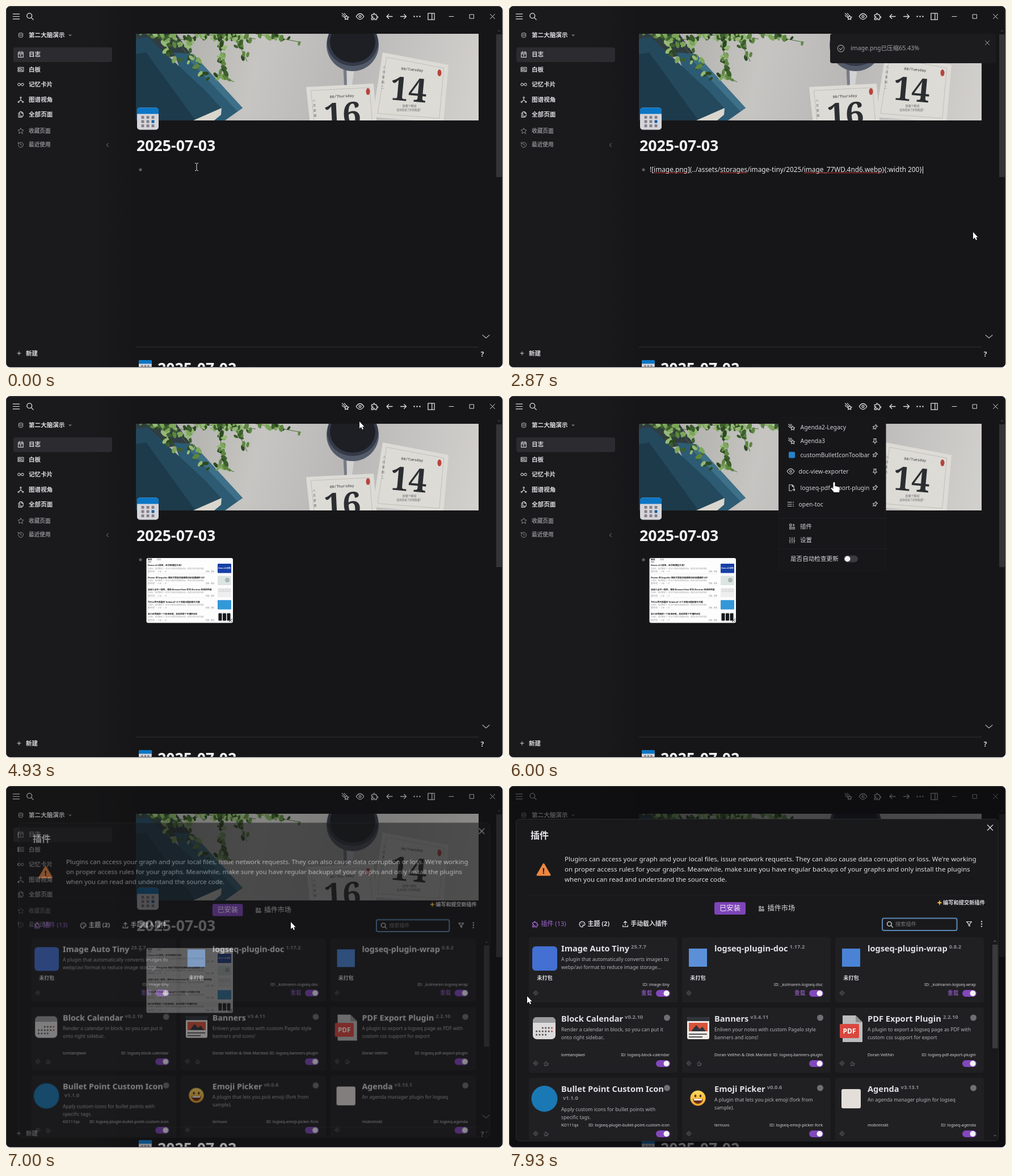
Write an HTML page with a canvas that moves like this. It is 876 px wide and 639 px high and loops after 8000 ms.

```html
<!DOCTYPE html>
<html lang="zh-CN">
<head>
<meta charset="utf-8">
<style>
html, body { margin: 0; width: 100%; height: 100%; overflow: hidden; background: #fff; }
canvas { display: block; }
</style>
</head>
<body>
<canvas id="stage" width="876" height="639"></canvas>
<script>
const W = 876, H = 639, LOOP = 8000, STEP = 200 / 3;
const SANS = '"Noto Sans", "Noto Sans CJK SC", "Noto Sans CJK", sans-serif';
const BG = '#161618', LIGHT = '#dcdce0', DIM = '#8a8a8f', PURPLE = '#a566dc';
const stage = document.getElementById('stage').getContext('2d');
let g = stage;

const ICONS = {
  menu: 'M3 5h18M3 12h18M3 19h18',
  search: 'M3 10a7 7 0 1 0 14 0a7 7 0 1 0-14 0M21 21l-6-6',
  db: 'M4 6a8 3 0 1 0 16 0a8 3 0 1 0-16 0V18a8 3 0 0 0 16 0V6M4 12a8 3 0 0 0 16 0',
  calendar: 'M4 5h16v16H4zM16 2v5M8 2v5M4 10h16M12 13v5M10 14l2-1',
  board: 'M3 5h18v14H3zM6 9h6v6H6zM16 8v5M15 16h3',
  infinity: 'M9.8 9.8a4 4 0 1 0 0 4.4L14.2 9.8a4 4 0 1 1 0 4.4z',
  graph: 'M12 7v6l-5 4M12 13l5 4M10 5a2 2 0 1 0 4 0a2 2 0 1 0-4 0M3 19a2 2 0 1 0 4 0a2 2 0 1 0-4 0M17 19a2 2 0 1 0 4 0a2 2 0 1 0-4 0',
  files: 'M15 3v5h5M9 3h6l5 5v9H9zM16 17v4H5V7h4',
  star: 'M12 17.7l-6.2 3.3 1.2-6.9-5-4.9 6.9-1L12 2l3.1 6.2 6.9 1-5 4.9 1.2 6.9z',
  history: 'M3 12a9 9 0 1 0 3-6.7M3 3v5h5M12 8v4l3 2',
  comet: 'M15.5 18.5l-4 2 .8-4-3-3 4-.5 2.200-4 2.200 4 4 .5-3 3 .8 4zM3 3l8 8M9 3l4 4M3 9l4 4',
  eye: 'M1 12q11-16 22 0q-11 16-22 0zM9 12a3 3 0 1 0 6 0a3 3 0 1 0-6 0',
  puzzle: 'M4 7h4V5a2 2 0 0 1 4 0v2h5v5h2a2 2 0 0 1 0 4h-2v5h-5v-2a2 2 0 0 0-4 0v2H3v-5h2a2 2 0 0 0 0-4H3V7z',
  back: 'M4 12h16M4 12l6 6M4 12l6-6',
  forward: 'M4 12h16M20 12l-6 6M20 12l-6-6',
  dots: 'M4 12h.01M12 12h.01M20 12h.01',
  panel: 'M3 3h18v18H3zM14 3v18',
  min: 'M4 12h16',
  max: 'M5 5h14v14H5z',
  close: 'M4 4l16 16M20 4L4 20',
  down: 'M3 8l9 8 9-8',
  left: 'M15 5l-7 7 7 7',
  plus: 'M12 4v16M4 12h16',
  pin: 'M9 4v6l-3 4v2h12v-2l-3-4V4M12 16v6M7 4h10',
  export: 'M14 3v5h5M12 21H5V3h9l5 5v6M14 18h8M19 15l3 3-3 3',
  list: 'M3 6h12M3 12h12M3 18h12M19 6h2M19 12h2M19 18h2',
  apps: 'M4 4h6v6H4zM4 14h6v6H4zM14 14h6v6h-6zM14 7h6M17 4v6',
  sliders: 'M5 3v8M5 17v4M3 14h4M12 3v3M12 12v9M10 9h4M19 3v10M19 18v3M17 15h4',
  check: 'M2 12a10 10 0 1 0 20 0a10 10 0 1 0-20 0M7 12l4 4 6-7',
  palette: 'M12 21a9 9 0 1 1 9-9c0 3-3 4-5 3s-3 1-2 3-1 3-2 3M8 10h.01M12 7h.01M16 10h.01',
  upload: 'M4 16v5h16v-5M12 16V3M7 8l5-5 5 5',
  filter: 'M3 4h18l-7 8v8l-4-3v-5z',
  gear: 'M4 12a8 8 0 1 0 16 0a8 8 0 1 0-16 0M9 12a3 3 0 1 0 6 0a3 3 0 1 0-6 0M12 2v2M12 20v2M2 12h2M20 12h2',
  cup: 'M3 11h14v5q0 4-4 4H7q-4 0-4-4zM17 13q5-1 4 2t-5 2M8 8V4M12 8V5M3 22h14'
};
for (const k in ICONS) ICONS[k] = new Path2D(ICONS[k]);

function icon(name, x, y, size = 14, color = LIGHT, lw = 1.2, turn = 0) {
  const s = size / 24;
  g.save();
  g.translate(x, y); g.rotate(turn); g.scale(s, s); g.translate(-12, -12);
  g.strokeStyle = color; g.lineWidth = lw / s; g.lineCap = g.lineJoin = 'round';
  g.stroke(ICONS[name]);
  g.restore();
}
function text(str, x, y, size, color = LIGHT, weight = 400, align = 'left', family = SANS) {
  g.font = `${weight} ${size}px ${family}`;
  g.textAlign = align; g.fillStyle = color;
  g.fillText(str, x, y + size * .36);
  return g.measureText(str).width;
}
function box(x, y, w, h, color, r = 0, border) {
  g.beginPath(); g.roundRect(x, y, w, h, r);
  if (color) { g.fillStyle = color; g.fill(); }
  if (border) { g.strokeStyle = border; g.lineWidth = 1; g.stroke(); }
}
function poly(points, color, border, lw = 1) {
  g.beginPath();
  for (let i = 0; i < points.length; i += 2) g.lineTo(points[i], points[i + 1]);
  g.closePath();
  if (color) { g.fillStyle = color; g.fill(); }
  if (border) { g.strokeStyle = border; g.lineWidth = lw; g.stroke(); }
}
function oval(x, y, rx, ry, color, turn = 0) {
  g.beginPath(); g.ellipse(x, y, rx, ry, turn, 0, 7); g.fillStyle = color; g.fill();
}
function toggle(x, y, on) {
  box(x, y - 6, 25, 12, on ? '#8347bd' : '#3b3b40', 6);
  oval(on ? x + 18.5 : x + 6.5, y, 5, 5, '#f2f2f4');
}
function layer(paint) {
  const c = document.createElement('canvas');
  c.width = W; c.height = H;
  g = c.getContext('2d');
  paint();
  g = stage;
  return c;
}
function dayIcon(x, y, s) {
  g.save(); g.translate(x, y); g.scale(s, s);
  box(0, 0, 38, 39, '#d6d5da', 5);
  box(0, 0, 38, 11, '#0b76c6', [5, 5, 0, 0]);
  for (let i = 0; i < 9; i++)
    box(7.5 + i % 3 * 9, 14.5 + (i / 3 | 0) * 7.5, 5, 5, i === 5 ? '#0b62a8' : '#858089', 1);
  g.restore();
}

function foliage() {
  let seed = 11;
  const rnd = () => (seed = seed * 16807 % 2147483647) / 2147483647;
  const greens = ['#3c5f2c', '#5d8640', '#7da65b', '#2c4822', '#96b878'];
  const stem = (x0, y0, x1, y1, n) => {
    g.strokeStyle = '#4c6b35'; g.lineWidth = 1;
    g.beginPath(); g.moveTo(x0, y0); g.lineTo(x1, y1); g.stroke();
    for (let i = 0; i < n; i++) {
      const p = rnd(), s = 3 + rnd() * 4;
      oval(x0 + (x1 - x0) * p + rnd() * 16 - 8, y0 + (y1 - y0) * p + rnd() * 12 - 6,
        s, s * .55, greens[rnd() * 5 | 0], rnd() * 3);
    }
  };
  stem(245, 49, 330, 62, 34);
  stem(268, 52, 300, 92, 16);
  stem(300, 60, 352, 126, 24);
  stem(330, 49, 440, 58, 46);
  stem(375, 52, 384, 122, 26);
  stem(405, 55, 425, 98, 12);
  stem(440, 49, 520, 64, 18);
  stem(372, 120, 402, 134, 6);
}
function sheet(points, day, dayX, dayY, caption, capX, capY, turn, dotX, dotY) {
  poly(points, '#dddbd6');
  const cx = (points[0] + points[2] + points[4] + points[6]) / 4;
  const cy = (points[1] + points[3] + points[5] + points[7]) / 4;
  poly(points.map((v, i) => { const c = i % 2 ? cy : cx; return c + (v - c) * .87; }), null, '#b5b2ac', .7);
  const put = (s, x, y, size, weight, family) => {
    g.save(); g.translate(x, y); g.rotate(turn);
    text(s, 0, 0, size, '#2b2e31', weight, 'center', family);
    g.restore();
  };
  put(day, dayX, dayY, 58, 700, '"Noto Serif", serif');
  put(caption, capX, capY, 6.5, 400, '"Liberation Mono", monospace');
  oval(dotX, dotY, 3.5, 6, '#b8433c');
}
function banner() {
  g.save();
  g.beginPath(); g.rect(229, 49, 604, 153); g.clip();
  const wall = g.createLinearGradient(229, 49, 833, 202);
  wall.addColorStop(0, '#a5a5a2'); wall.addColorStop(.35, '#c6c5c2');
  wall.addColorStop(.6, '#b9b8b7'); wall.addColorStop(1, '#d3d1cd');
  g.fillStyle = wall; g.fillRect(229, 49, 604, 153);
  poly([229, 49, 300, 49, 325, 84, 229, 100], '#303d42');
  poly([296, 82, 330, 85, 417, 180, 386, 202, 340, 202], '#2c5b73');
  poly([330, 85, 417, 180, 408, 186, 318, 90], '#3e7089');
  poly([229, 58, 250, 55, 352, 150, 380, 181, 345, 202, 229, 202], '#24495c');
  poly([229, 85, 247, 82, 334, 202, 229, 202], '#1c3a4a');
  poly([380, 180, 379, 192, 367, 202, 330, 202], '#d9d6cd');
  foliage();
  poly([594, 100, 615, 103, 610, 140, 604, 146, 596, 141], '#d2d2d3');
  poly([594, 100, 600, 101, 601, 143, 596, 141], '#777b85');
  oval(611, 69, 46, 46, '#535a69');
  oval(611, 64, 45, 42, '#343a48');
  oval(611, 63, 40, 37, '#1d1f24');
  sheet([664, 82, 780, 104, 771, 206, 646, 196], '14', 710, 147, '08/Tuesday', 716, 112, .09, 764, 118);
  sheet([529, 143, 648, 137, 656, 240, 540, 246], '16', 593, 191, '08/Thursday', 592, 159, -.05, 638, 151);
  [...'八月星期二'].forEach((c, i) => text(c, 667 - i * .9, 107 + i * 9, 5, '#666', 400, 'center'));
  [...'八月星期'].forEach((c, i) => text(c, 543 + i * .6, 166 + i * 9, 5, '#666', 400, 'center'));
  text('是哪个瞬间', 711, 176, 5, '#666', 400, 'center');
  text('给你带来了好的能量?', 710, 183, 4.5, '#666', 400, 'center');
  g.restore();
}
function shell() {
  g.fillStyle = '#fff'; g.fillRect(0, 0, W, H);
  box(0.5, 0.5, 874.5, 637, BG, 7, '#4a4a4d');
  g.beginPath(); g.roundRect(1, 1, 873.5, 636, 6); g.clip();
  const side = g.createLinearGradient(150, 0, 230, 0);
  side.addColorStop(0, '#1a1a1c'); side.addColorStop(1, BG);
  g.fillStyle = side; g.fillRect(1, 1, 229, 636);

  icon('menu', 18, 18.5, 15); icon('search', 42.5, 18.5, 15, LIGHT, 1.4);
  ['comet', 'eye', 'puzzle', 'back', 'forward', 'dots', 'panel'].forEach((n, i) =>
    icon(n, [598, 624, 650, 676, 700.5, 724.5, 749.5][i], 18.5, 15, LIGHT, n === 'dots' ? 2.6 : 1.3));
  icon('min', 785, 18.5, 12, LIGHT, 1);
  icon('max', 821, 18.5, 12, LIGHT, 1);
  icon('close', 857.5, 18.5, 12, LIGHT, 1);

  icon('db', 26, 51.5, 11, '#a8a8ac', 1);
  text('第二大脑演示', 40, 51, 10.6, LIGHT, 700);
  poly([110, 50.5, 116, 50.5, 113, 53.5], '#77777b');
  box(13, 73, 174, 26, '#2b2b30', 4);
  [['calendar', '日志', 85.5], ['board', '白板', 112], ['infinity', '记忆卡片', 138.5],
   ['graph', '图谱视角', 165.5], ['files', '全部页面', 191.5]].forEach(([n, s, y]) => {
    icon(n, 26, y, 13, '#cfcfd3', 1.1); text(s, 40, y, 10.6, LIGHT, 700);
  });
  icon('star', 26, 220.500, 12, DIM, 1); text('收藏页面', 40, 220.5, 9.7, DIM, 700);
  icon('history', 26, 245, 12, DIM, 1); text('最近使用', 40, 245, 9.7, DIM, 700);
  icon('left', 179, 245.5, 10, DIM, 1);
  icon('plus', 23, 613, 9, '#cfcfd3', 1); text('新建', 35, 613, 10.5, LIGHT, 700);

  banner();
  dayIcon(231, 179.5, 1);
  text('2025-07-03', 230, 246, 26.7, '#f4f4f6', 700);
  box(229, 601.5, 604, 1, '#333336');
  dayIcon(234, 625, .6);
  text('2025-07-02', 267, 639, 26.7, '#f4f4f6', 700);
  oval(237, 289, 2.6, 2.6, '#5c5c60');
  icon('down', 846, 583.5, 16, '#c8c8cc', 1.1);
  text('?', 839.5, 615, 12, LIGHT, 700, 'center');
  box(864, 50, 10, 252, '#343437');
  poly([866, 45, 872, 45, 869, 42], '#39393c');
}

const CODE = '![image.png](../assets/storages/image-tiny/2025/image_77WD.4nd6.webp){:width 200}';
function codeLine() {
  text(CODE, 248, 288.5, 11.85, '#e6e6ea');
  for (const word of ['image.png', 'storages', 'image_77WD.4nd6.webp']) {
    const at = CODE.indexOf(word), x0 = 248 + g.measureText(CODE.slice(0, at)).width;
    const x1 = x0 + g.measureText(word).width;
    g.beginPath();
    for (let x = x0, i = 0; x < x1; x += 1.6, i++) g.lineTo(x, i % 2 ? 295.3 : 293.7);
    g.strokeStyle = '#d8322f'; g.lineWidth = 1; g.stroke();
  }
}
function thumbnail() {
  box(247.5, 286, 152.500, 114.5, '#fdfdfd', 3);
  text('推荐', 250, 289, 3.8, '#222', 700); text('最新', 266, 289, 3.8, '#888');
  box(250, 292.5, 6, .8, '#333');
  ['Demo v2.6发布，这次有哪些大改?', 'Flutter 的 Impeller 图形引擎是否能够解决动态模糊的 UI?',
   '谈谈几点不一样的，使用 BrowserView 优化 Electron 应用的性能',
   '为什么我不再喜欢 Tailwind? 三个关键问题和替代方案', '前几天我做的一个安卓应用，目前获得了不错的评价'].forEach((s, i) => {
    const y = 299 + i * 21.4;
    text(s, 250, y, 3.8, '#111', 700);
    text('大家好，最近整理了一些关于新版本的使用体会，希望对你们有所帮助', 250, y + 5.5, 3.2, '#999');
    text('匿名作者   ◦ 2.6k   ◦ 21', 250, y + 11, 3, '#888');
    text('前端、框架', 367, y + 11, 3, '#888', 400, 'right');
    box(250, y + 14, 117, .4, '#e5e5e5');
    box(373, y - 3, 24, 16.5, ['#173fa6', '#dde5e3', '#eeeeee', '#3398d8', '#f1f1f1'][i], 1);
  });
  text('Demo v2.6发布', 385, 304, 3, '#fff', 700, 'center');
  oval(390, 325, 4, 4, '#aab9b8');
  for (let i = 0; i < 3; i++) {
    box(376 + i * 7, 341, 5, 4, null, 0, '#cfcfcf');
    box(374.5 + i * 7.500, 383.5, 6, 13, '#15181b', 1);
  }
  g.strokeStyle = '#222'; g.lineWidth = 1;
  g.beginPath(); g.moveTo(393, 399); g.lineTo(399, 393); g.moveTo(396.5, 399); g.lineTo(399, 396.5); g.stroke();
}
function toast() {
  box(566, 49, 292, 52, '#1c1c1f', 4);
  icon('check', 585, 75, 14, '#a2a2a6', 1.1);
  text('image.png已压缩65.43%', 602, 74.5, 10.6, '#a2a2a6', 500);
  icon('close', 843, 65, 11, '#a2a2a6', 1);
}
function menu() {
  box(475.5, 38, 188.5, 270, '#17171a', 4, '#1d1d20');
  [['comet', 'Agenda2-Legacy', 55], ['comet', 'Agenda3', 79.5, 1], ['', 'customBulletIconToolbar', 104],
   ['eye', 'doc-view-exporter', 133, 1], ['export', 'logseq-pdf-export-plugin', 162], ['list', 'open-toc', 191]]
    .forEach(([n, s, y, pinned]) => {
      if (n) icon(n, n === 'eye' || n === 'list' ? 496.5 : 498, y, 14, '#cfcfd3', 1.1);
      else box(493, 98.500, 11, 11, '#2583cc', 2);
      text(s, n === 'eye' || n === 'list' ? 510.5 : 513.5, y, 10.4, '#d2d2d6');
      icon('pin', 645, y, 12, '#cfcfd3', 1.1, pinned ? 0 : Math.PI / 4);
    });
  box(477, 215.5, 187, 1, '#232326');
  icon('apps', 499, 230.5, 13, '#b4b4b8', 1.1); text('插件', 513, 230, 10.5, '#d2d2d6');
  icon('sliders', 499, 254.5, 13, '#b4b4b8', 1.1); text('设置', 513, 254, 10.5, '#d2d2d6');
  box(477, 269.5, 187, 1, '#232326');
  text('是否自动检查更新', 496, 287, 10.6, LIGHT);
  toggle(590, 287.5, false);
}

const PLUGINS = [
  ['Image Auto Tiny', '25.7.7', 'A plugin that automatically converts images to|webp/avi format to reduce image storage...', '', 'image-tiny'],
  ['logseq-plugin-doc', '1.17.2', '', '', '_kolmaren-logseq-doc'],
  ['logseq-plugin-wrap', '0.8.2', '', '', '_kolmaren-logseq-wrap'],
  ['Block Calendar', 'v0.2.10', 'Render a calendar in block, so you can put it|onto right sidebar..', 'lomtanqiwei', 'logseq-block-calendar'],
  ['Banners', 'v3.4.11', 'Enliven your notes with custom Pagelo style|banners and icons!', 'Doran Velthin & Olek Marsted', 'logseq-banners-plugin'],
  ['PDF Export Plugin', '2.2.10', 'A plugin to export a logseq page as PDF with|custom css support for export', 'Doran Velthin', 'logseq-pdf-export-plugin'],
  ['Bullet Point Custom Icon', 'v1.1.0', 'Apply custom icons for bullet points with|specific tags.', 'KO111qx', 'logseq-plugin-bullet-point-custom-icon'],
  ['Emoji Picker', 'v0.0.6', 'A plugin that lets you pick emoji (fork from|sample).', 'ternuvo', 'logseq-emoji-picker-fork'],
  ['Agenda', 'v3.13.1', 'An agenda manager plugin for logseq', 'mobrenskt', 'logseq-agenda']
];
const ART = [
  () => box(6, 16, 44, 43, '#4370d2', 6),
  () => box(12, 20, 32, 32, '#5b90d8'),
  () => box(12, 20, 32, 32, '#4a83d6'),
  () => {
    box(7, 17, 40, 39, '#dcdada', 7); box(7, 17, 40, 10, '#9b9b9d', [7, 7, 0, 0]);
    for (let i = 0; i < 18; i++)
      if (i > 1 && i < 16) oval(13.5 + i % 6 * 5.4, 36 + (i / 6 | 0) * 6, 1.5, 1.5, i % 6 === 5 ? '#cf4840' : '#55494a');
  },
  () => {
    box(9, 17, 39, 39, '#efebe6', 3); box(9, 17, 39, 7, '#30353c', [3, 3, 0, 0]);
    box(12, 27, 33, 15, '#d8533a');
    poly([16, 42, 25, 31, 31, 38, 36, 34, 42, 42], '#30353c');
    box(12, 46, 32, 2, '#555'); box(12, 51, 24, 2, '#555');
  },
  () => {
    poly([13, 14, 36, 14, 48, 26, 48, 61, 13, 61], '#bcbcbc'); poly([36, 14, 48, 26, 36, 26], '#8f8f8f');
    box(8, 29, 34, 25, '#d9473f', 2);
    text('PDF', 25, 41.5, 12, '#fff', 700, 'center');
  },
  () => oval(27.5, 37, 23, 23, '#1a78b4'),
  () => {
    const glow = g.createLinearGradient(0, 22, 0, 50);
    glow.addColorStop(0, '#ffdb5e'); glow.addColorStop(1, '#eda02c');
    oval(28, 36, 13.5, 13.5, glow);
    oval(23.5, 32, 1.8, 2.6, '#5a3a12'); oval(32.5, 32, 1.8, 2.6, '#5a3a12');
    g.beginPath(); g.arc(28, 37.5, 8.500, 0, Math.PI); g.fillStyle = '#6b2d16'; g.fill();
    box(21, 37.5, 14, 2.5, '#fff');
  },
  () => box(11, 20, 34, 34, '#e3ded9', 3)
];
function card([name, version, about, author, id], i) {
  const local = i < 3, wraps = i === 6;
  g.save();
  g.translate(35 + i % 3 * 270, 267 + (i / 3 | 0) * 124);
  box(0, 0, 262, 115, '#202023', 4);
  ART[i]();
  const w = text(name, 57, 19.5, 14.6, '#e2e2e6', 700);
  text(version, wraps ? 60 : 60 + w, wraps ? 35.5 : 17, 9.4, '#8b8b90', 700);
  about.split('|').forEach((s, k) => text(s, 57, (wraps ? 56 : 39) + k * 13.7, 8.7, '#b2b2b6'));
  text(author, 57, 83, 7.2, '#d5d5d9');
  text('ID: ' + id, 248, 83, 7.2, '#d5d5d9', 400, 'right');
  icon('gear', 12, 98.5, 10, '#5e5e62', .9);
  if (local) {
    text('未打包', 28, 72, 9.2, '#dcdce0', 700, 'center');
    text('重载', 198, 98.5, 9.7, PURPLE);
  } else {
    oval(243.5, 18, 5.500, 5.5, '#6f6f73');
    if (i < 7) icon('cup', 31, 98.5, 10, '#5e5e62', .9);
  }
  toggle(224, 99, true);
  g.restore();
}
function modal() {
  box(12.5, 58.5, 850, 568, '#19191b', 6, '#2b2b2f');
  text('插件', 38, 87, 16, '#e8e8ec', 700);
  icon('close', 848, 73.5, 14, LIGHT, 1.3);
  g.lineJoin = 'round';
  poly([61, 138, 72, 157, 50, 157], '#ef8741', '#ef8741', 3);
  text('!', 61, 149.500, 15, '#1b1b1d', 700, 'center');
  ["Plugins can access your graph and your local files, issue network requests. They can also cause data corruption or loss. We're working",
   'on proper access rules for your graphs. Meanwhile, make sure you have regular backups of your graphs and only install the plugins',
   'when you can read and understand the source code.'].forEach((s, i) => text(s, 98, 128.5 + i * 18.2, 11.6, '#e2e2e6'));
  box(38, 192.5, 800, 1, '#232327');
  box(362, 205, 55, 22, '#7e45b8', 3);
  text('已安装', 389.500, 215.5, 12.3, '#f3eef8', 500, 'center');
  icon('apps', 445, 216.5, 12, LIGHT, 1.1); text('插件市场', 455.5, 215.5, 12.2, LIGHT, 500);
  poly([759, 201, 760.3, 204.700, 764, 206, 760.3, 207.3, 759, 211, 757.7, 207.3, 754, 206, 757.7, 204.7], '#f0b440');
  text('编写和提交新插件', 765, 206, 9.25, LIGHT, 700);
  icon('puzzle', 46.5, 244, 13, PURPLE, 1.2); text('插件 (13)', 56.5, 243.5, 11, PURPLE, 500);
  icon('palette', 129, 244, 13, LIGHT, 1.3); text('主题 (2)', 138.5, 243.5, 11, LIGHT, 700);
  icon('upload', 205, 243.5, 13, LIGHT, 1.2); text('手动载入插件', 214.5, 243, 10.8, LIGHT, 700);
  g.lineWidth = 2; g.strokeStyle = '#5c87b5';
  g.beginPath(); g.roundRect(658, 233.5, 131.5, 21.5, 3); g.stroke();
  icon('search', 671.5, 244.5, 13, LIGHT, 1.4); text('搜索插件', 681, 244, 9.25, '#77777c');
  icon('filter', 811, 243.5, 12, LIGHT, 1.2);
  icon('dots', 833, 243.5, 13, LIGHT, 2.4, Math.PI / 2);
  g.save();
  g.beginPath(); g.rect(14, 262, 848, 363); g.clip();
  PLUGINS.forEach(card);
  g.restore();
  box(852, 280, 9.500, 183, '#3a3a3d');
  poly([853.5, 275, 859.5, 275, 856.5, 272], '#4a4a4d');
  poly([853.500, 616, 859.5, 616, 856.5, 619], '#4a4a4d');
}

// Pointer track: time, x, y
const TRACK = [
  [0, 336, 284], [267, 319, 292], [1600, 319, 292], [1800, 454, 327], [1933, 610, 360], [2133, 770, 390],
  [2467, 818, 398], [2670, 818, 398], [2867, 818, 399], [3600, 818, 399], [4067, 804, 416], [4400, 804, 416],
  [4600, 750, 300], [4800, 655, 100], [4933, 623, 45], [5100, 638, 24], [5267, 650, 14], [5400, 650, 14],
  [6000, 573, 152], [6133, 566, 175], [6533, 503, 235], [6870, 503, 235], [7000, 502, 240],
  [7133, 478, 262], [7533, 244, 481], [7600, 244, 481], [7733, 32, 372], [7933, 32, 371]
];
function pointer(t) {
  let i = 1;
  while (i < TRACK.length - 1 && TRACK[i][0] < t) i++;
  const [t0, x0, y0] = TRACK[i - 1], [t1, x1, y1] = TRACK[i];
  const p = Math.min(1, (t - t0) / (t1 - t0));
  g.save();
  g.translate(x0 + (x1 - x0) * p, y0 + (y1 - y0) * p);
  if (t < 1700) {
    g.strokeStyle = '#e8e8e8'; g.lineWidth = 1;
    g.stroke(new Path2D('M-3 -6.500h2l1 1 1-1h2M0 -5.500v11M-3 6.500h2l1-1 1 1h2'));
  } else {
    const hand = t > 5050 && t < 6850;
    const shape = new Path2D(hand
      ? 'M-1.500 1q1.500-2 3 0v6l7 1.500q2 .5 1.500 3l-1 6.500h-9l-5-6q-1-2 1-2l2.500 2z'
      : 'M0 0V12.500L3 9.800 5 14.200 7 13.300 5 9.200H8.600z');
    g.lineJoin = 'round'; g.strokeStyle = '#0b0b0c'; g.lineWidth = 1.4;
    g.stroke(shape); g.fillStyle = '#fff'; g.fill(shape);
  }
  g.restore();
}

const clamp = v => Math.max(0, Math.min(1, v));
const easeOut = v => 1 - (1 - clamp(v)) ** 2;
const layers = { shell: layer(shell), toast: layer(toast), menu: layer(menu), modal: layer(modal) };

function caret(x) { box(x, 283, 1, 13, '#f0f0f2'); }
function show(name, alpha, dy = 0) {
  g.globalAlpha = alpha; g.drawImage(layers[name], 0, dy); g.globalAlpha = 1;
}
function draw(t) {
  g.drawImage(layers.shell, 0, 0);
  if (t >= 990 && t < 1525) caret(248);
  if (t >= 3525) thumbnail();
  else if (t >= 1660) {
    codeLine();
    if ((t - 1660) % 1065 < 532) caret(729);
  }
  const rise = easeOut((t - 1710) / 300);
  show('toast', rise * (1 - clamp((t - 3620) / 200)), 6 * (1 - rise));
  if (t >= 5325 && t < 6860) show('menu', clamp((t - 5260) / 130));
  const p = easeOut((t - 6905) / 300);
  if (p > 0) {
    box(1, 1, 873.5, 636, `rgba(12,12,14,${.66 * p})`, 6);
    const s = .95 + .05 * p;
    g.save();
    g.translate(438 * (1 - s), 341 * (1 - s)); g.scale(s, s);
    show('modal', p);
    g.restore();
  }
  pointer(t);
}
function tick(now) {
  draw(Math.floor((now % LOOP + 4) / STEP) * STEP);
  requestAnimationFrame(tick);
}
requestAnimationFrame(tick);
</script>
</body>
</html>
```
